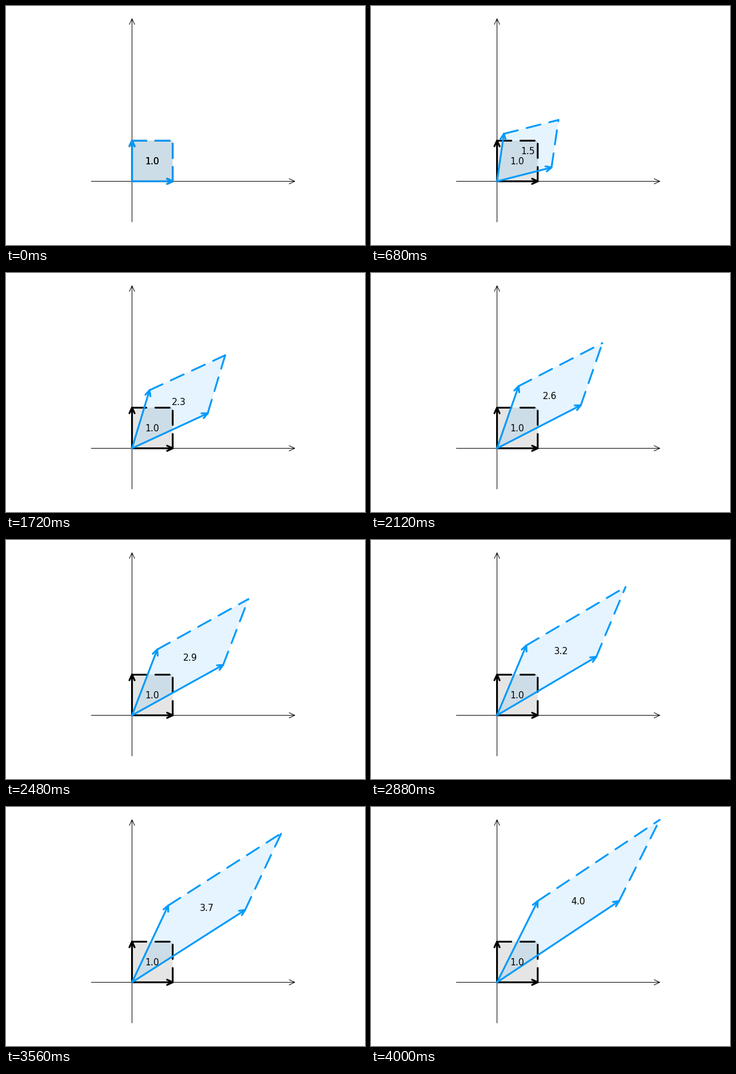
Write a matplotlib script that moves like this. It is 600 by 400 pixels and loops after 4040 ms.

```python
import matplotlib.pyplot as plt
import numpy as np
from matplotlib.animation import FuncAnimation

W, H, DPI = 600, 400, 72          # at 72 dpi one point is one pixel
FRAMES, INTERVAL = 101, 40
ORIGIN = np.array([210.6, 293.4])
UNIT = 68
BLUE = "#009AFA"
TARGET = np.array([[3, 1], [2, 2]])
BARB, SPREAD = 10.4, np.radians(25)

plt.rcParams["font.family"] = "DejaVu Sans"
fig = plt.figure(figsize=(W / DPI, H / DPI), dpi=DPI, facecolor="white")
ax = fig.add_axes([0, 0, 1, 1])
ax.set(xlim=(0, W), ylim=(H, 0))
ax.axis("off")


def px(v):
    return ORIGIN + UNIT * np.array([v[0], -v[1]])


class Arrow:
    """Straight shaft with an open two-barb head."""

    def __init__(self, color, width):
        style = dict(color=color, lw=width, snap=False,
                     solid_capstyle="round", solid_joinstyle="round")
        self.shaft, = ax.plot([], [], **style)
        self.head, = ax.plot([], [], **style)

    def set(self, tail, tip):
        a, b = px(tail), px(tip)
        back = np.arctan2(*(a - b)[::-1])
        barbs = [b + BARB * np.array([np.cos(back + s), np.sin(back + s)])
                 for s in (-SPREAD, SPREAD)]
        self.shaft.set_data(*np.transpose([a, b]))
        self.head.set_data(*np.transpose([barbs[0], b, barbs[1]]))


class Cell:
    """Parallelogram spanned by the columns of a matrix, with its area."""

    def __init__(self, color):
        self.area, = ax.fill([0, 0, 0, 0], [0, 0, 0, 0], color=color,
                             alpha=0.1, lw=0, snap=False)
        self.arrows = [Arrow(color, 3) for _ in range(2)]
        self.edges = [ax.plot([], [], color=color, lw=3, ls=(0, (8, 5)),
                              dash_capstyle="round", snap=False)[0]
                      for _ in range(2)]
        self.label = ax.text(0, 0, "", size=15, color="black",
                             ha="center", va="baseline", zorder=5)

    def set(self, m):
        sides = m.T
        corner = sides.sum(axis=0)
        self.area.set_xy([px(p) for p in ((0, 0), sides[0], corner, sides[1])])
        for side, arrow, edge in zip(sides, self.arrows, self.edges):
            arrow.set((0, 0), side)
            edge.set_data(*np.transpose([px(side), px(corner)]))
        x, y = px(corner / 2)
        self.label.set_position((x, y + 5.5))
        self.label.set_text(f"{np.round(np.linalg.det(m), 1):.1f}")


for axis in np.eye(2):
    Arrow("black", 1).set(-axis, 4 * axis)

Cell("black").set(np.eye(2))
moving = Cell(BLUE)


def update(n):
    t = n / (FRAMES - 1)
    moving.set((1 - t) * np.eye(2) + t * TARGET)
    return []


anim = FuncAnimation(fig, update, frames=FRAMES, interval=INTERVAL,
                     repeat=True, repeat_delay=0)
plt.show()
```
